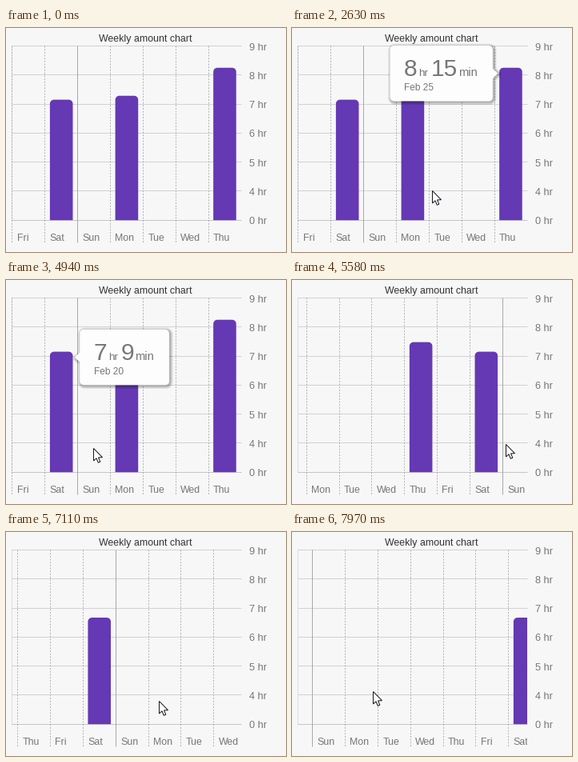
Write a matplotlib script that moves like this. It is 350 px wide and 280 px high and loops after 8000 ms.

```python
import numpy as np
import matplotlib.pyplot as plt
from matplotlib.animation import FuncAnimation
from matplotlib.patches import Polygon, Rectangle
from matplotlib.transforms import Affine2D

plt.rcParams["font.family"] = "Liberation Sans"

W, H, DPI = 350, 280, 70
PX = 72 / DPI
STEP, LOOP = 40, 8000
LEFT, RIGHT, COL = 7.45, 294.2, 40.85
TOP, HOUR = 22, 36.28
BASE = TOP + 6 * HOUR + 0.5
BG, PURPLE, GREY = "#f7f7f7", "#6538b4", "#777777"
DAYS = ["Fri", "Sat", "Sun", "Mon", "Tue", "Wed", "Thu"]
HOURS = {-6: 6.67, -1: 7.48, 1: 7.15, 3: 7.285, 6: 8.25}
WEEK = 7 * COL
FADE_IN, FADE_OUT, FLING = 150, 75, 700

# pointer storyboard: start, end, target x, target y
ENTRY = np.array([310, 268])
MOVES = [
    (530, 990, 274, 210), (1860, 2600, 175, 203), (2700, 2950, 151, 203),
    (3630, 4050, 66, 203), (4460, 4700, 123, 224), (4860, 4940, 109, 210),
    (5340, 5632, 281, 205), (5660, 6680, 143, 214), (6940, 7340, 278, 206),
    (7400, 7740, 165, 203), (7790, 7960, 101, 199)]

# drags: grab, release, scroll the fling settles on
DRAGS = [(5340, 5486, WEEK), (6940, 7140, 2 * WEEK), (7790, LOOP, 2 * WEEK)]


def progress(t, start, end):
    return np.clip((t - start) / (end - start), 0, 1)


def smooth(u):
    return u * u * (3 - 2 * u)


def pointer_at(t):
    pos = ENTRY
    for start, end, x, y in MOVES:
        pos = pos + (np.array([x, y]) - pos) * smooth(progress(t, start, end))
    return pos


def scroll_at(t):
    """Follow the pointer while dragging, then ease out to the goal."""
    off = 0
    for grab, release, goal in DRAGS:
        if t >= grab:
            off += pointer_at(min(t, release))[0] - pointer_at(grab)[0]
            u = progress(t, release, release + FLING)
            off += (goal - off) * (1 - (1 - u) ** 4)
    return off


def hour_y(h):
    return TOP + 0.5 + (9 - h) * HOUR


def col_x(k):
    return LEFT + COL * k


def bar_x(k):
    return col_x(k) + 6.6


def rounded(x0, y0, x1, y1, r, r_low, arrow=None):
    """Rounded box outline, with an optional arrow on one side."""
    pts = []
    mid = (y0 + y1) / 2
    corners = [(x0 + r, y0 + r, r, 180), (x1 - r, y0 + r, r, 270),
               (x1 - r_low, y1 - r_low, r_low, 0),
               (x0 + r_low, y1 - r_low, r_low, 90)]
    for side, (cx, cy, rad, start) in enumerate(corners):
        a = np.radians(np.linspace(start, start + 90, 7))
        pts += list(zip(cx + rad * np.cos(a), cy + rad * np.sin(a)))
        if arrow == "right" and side == 1:
            pts += [(x1, mid - 6), (x1 + 6.5, mid), (x1, mid + 6)]
        if arrow == "left" and side == 3:
            pts += [(x0, mid + 6), (x0 - 6.5, mid), (x0, mid - 6)]
    return np.array(pts)


fig = plt.figure(figsize=(W / DPI, H / DPI), dpi=DPI, facecolor=BG)
ax = fig.add_axes([0, 0, 1, 1])
ax.set_xlim(0, W)
ax.set_ylim(H, 0)
ax.axis("off")

shift = Affine2D()
moving = shift + ax.transData


def window(x):
    return Rectangle((x, 0), RIGHT - x, H, transform=ax.transData)


def label(x, y, s, size, color=GREY, **kw):
    return ax.text(x, y, s, fontsize=size * PX, color=color,
                   va="baseline", **kw)


class Tooltip:
    def __init__(self, day, minutes, date, side, start, end):
        self.start, self.end = start, end
        self.parts = []
        digits = 16.7 * len(minutes)
        w = 95 + digits
        x = bar_x(day) - 8.3 - w if side == "right" else bar_x(day) + 37.3
        y = hour_y(HOURS[day]) - 27.8
        shape = rounded(x, y, x + w, y + 69.5, 5, 5, side)
        for width in (1.5, 3, 5, 7):
            self.add(ax.add_patch(Polygon(
                shape + (1.2, 1.2), fc="none", ec="black", joinstyle="round",
                lw=width * PX, zorder=5)), 0.08)
        self.add(ax.add_patch(Polygon(shape, fc="#fdfdfd", lw=0, zorder=6)), 1)
        hours = str(int(HOURS[day]))
        for dx, dy, s, size in [(17, 38, hours, 30), (35.5, 38, "hr", 13.5),
                                (51, 38, minutes, 30),
                                (52.5 + digits, 38, "min", 14.8),
                                (17.3, 56.5, date, 11.9)]:
            self.add(label(x + dx, y + dy, s, size, zorder=7), 1)

    def add(self, artist, alpha):
        self.parts.append((artist, alpha))

    def show(self, t):
        level = (progress(t, self.start, self.start + FADE_IN)
                 - progress(t, self.end, self.end + FADE_OUT))
        for artist, alpha in self.parts:
            artist.set_alpha(alpha * level)
            artist.set_visible(level > 0)


# fixed frame and scale
label(174, 17, "Weekly amount chart", 12.4, "#333333", ha="center")
ax.plot([7, 7], [TOP, BASE], color="#dadada", lw=0.9 * PX, zorder=1)
for row, h in enumerate([9, 8, 7, 6, 5, 4, 0]):
    y = TOP + row * HOUR
    ax.plot([7, RIGHT], [y, y], color="#c6c6c6" if h == 0 else "#d2d2d2",
            lw=PX, zorder=1, solid_capstyle="butt")
    label(304.5, y + 5.6, f"{h} hr", 12.7)

# scrolling days and bars
for k in range(-14, 7):
    sunday = DAYS[k % 7] == "Sun"
    line, = ax.plot([col_x(k)] * 2, [TOP, 268], transform=moving, zorder=2,
                    color="#a0a0a0" if sunday else "#ababab", lw=0.9 * PX,
                    ls="-" if sunday else (0, (2.2, 1.9)),
                    solid_capstyle="butt", dash_capstyle="butt")
    line.set_clip_path(window(7))
    name = label(col_x(k) + 6.4, 266, DAYS[k % 7], 12.4,
                 transform=moving, clip_on=True)
    name.set_clip_path(window(9))
for k, h in HOURS.items():
    bar = Polygon(rounded(bar_x(k), hour_y(h), bar_x(k) + 28.6, BASE, 5, 0.01),
                  fc=PURPLE, lw=0, transform=moving, zorder=3)
    ax.add_patch(bar)
    bar.set_clip_path(window(7))

tips = [Tooltip(6, "15", "Feb 25", "right", 1380, 3020),
        Tooltip(3, "17", "Feb 22", "left", 3170, 4240),
        Tooltip(1, "9", "Feb 20", "left", 4330, 5340)]

ARROW = np.array([(0.5, 0.5), (0.5, 16), (4, 12.8), (6.3, 18.3), (8.8, 17.2),
                  (6.5, 11.9), (11.5, 11.7)])
pointer = ax.add_patch(Polygon(ARROW, fc="white", ec="#16161e", lw=PX,
                               joinstyle="miter", zorder=9))


def update(i):
    t = i * STEP + STEP / 2
    shift.clear().translate(scroll_at(t), 0)
    pointer.set_xy(ARROW + np.round(pointer_at(t)))
    pointer.set_visible(t >= MOVES[0][0])
    for tip in tips:
        tip.show(t)
    return []


anim = FuncAnimation(fig, update, frames=LOOP // STEP, interval=STEP,
                     repeat=True, repeat_delay=0, blit=False)
plt.show()
```
